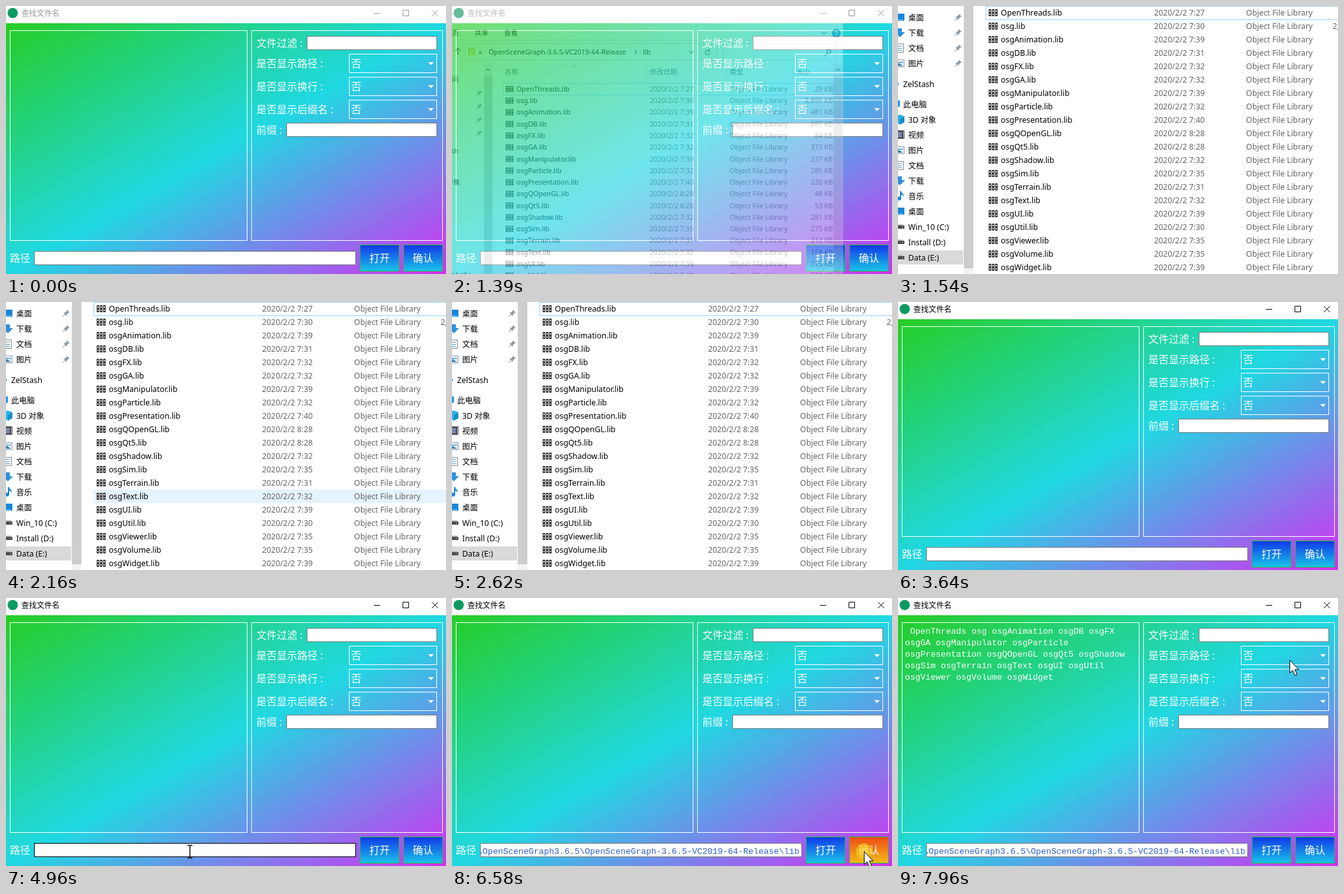
Write an HTML page that moves like this. It is 689 px wide and 420 px high and loops after 8000 ms.

```html
<!DOCTYPE html>
<html lang="zh">
<head>
<meta charset="utf-8">
<title>查找文件名</title>
<style>
html, body { margin: 0; width: 100%; height: 100%; overflow: hidden; background: #fff; }
svg { display: block; width: 689px; height: 420px; }
text { white-space: pre; }
.cjk { font: 300 16px "Noto Sans CJK SC", "Noto Sans CJK", sans-serif; fill: #fff; }
.mono { font: 13.333px "Liberation Mono", monospace; fill: #fff; }
.title { font: 12px "Noto Sans CJK SC", "Noto Sans CJK", sans-serif; }
.ui { font: 12.35px "Noto Sans", "Noto Sans CJK SC", "Noto Sans CJK", sans-serif; fill: #000; }
.dim { fill: #646464; }
</style>
</head>
<body>
<svg id="stage" viewBox="0 0 689 420" xmlns="http://www.w3.org/2000/svg"></svg>
<script>
const LOOP = 8000;
const stage = document.getElementById('stage');

const text = (s, x, y, cls, extra = '') => `<text x="${x}" y="${y}" class="${cls}" ${extra}>${s}</text>`;
const rect = (x, y, w, h, fill, extra = '') => `<rect x="${x}" y="${y}" width="${w}" height="${h}" fill="${fill}" ${extra}/>`;
const frame = (x, y, w, h, stroke, fill = 'none', extra = '') =>
  rect(x + .5, y + .5, w - 1, h - 1, fill, `stroke="${stroke}" ${extra}`);
const line = (d, stroke, width = 1) => `<path d="${d}" fill="none" stroke="${stroke}" stroke-width="${width}"/>`;
const gradient = (id, x2, stops) => `<linearGradient id="${id}" x1="0" y1="0" x2="${x2}" y2="1">` +
  stops.map((c, i) => `<stop offset="${i / (stops.length - 1)}" stop-color="${c}"/>`).join('') + '</linearGradient>';

// Search window
const label = (s, x, y) => text(s + '<tspan dx="4">:</tspan>', x, y, 'cjk');
const combo = y => frame(537, y, 138, 30, '#fff') + text('否', 540.5, y + 21, 'cjk') +
  `<path d="M661 ${y + 13}h9l-4.5 4.5z" fill="#fff"/>`;
const button = (id, s, x) => frame(x, 374, 62, 42, '#18c838', 'url(#idle)', `id="${id}"`) + text(s, x + 15, 401, 'cjk');

const results = [
  ' OpenThreads osg osgAnimation osgDB osgFX',
  'osgGA osgManipulator osgParticle',
  'osgPresentation osgQOpenGL osgQt5 osgShadow',
  'osgSim osgTerrain osgText osgUI osgUtil',
  'osgViewer osgVolume osgWidget'
];
const path = '\\OpenSceneGraph3.6.5\\OpenSceneGraph-3.6.5-VC2019-64-Release\\lib';

function searchWindow() {
  return rect(0, 0, 689, 27, '#fff') +
    '<circle cx="10.5" cy="11" r="8" fill="#0f9a62"/>' +
    text('查找文件名', 24, 16, 'title', 'id="title"') +
    '<path id="winButtons" d="M576 11.5h10M621.5 6.5h9v9h-9zM667 6.5l9.5 9.5m0-9.5l-9.5 9.5" fill="none"/>' +
    rect(0, 27, 689, 393, 'url(#sky)') +
    frame(6, 38, 372, 330, '#fff') + frame(384, 38, 300, 330, '#fff') +
    label('文件过滤', 392, 64) + frame(471, 47, 204, 22, '#7a7a7a', '#fff') +
    label('是否显示路径', 392, 96) + combo(75) +
    label('是否显示换行', 392, 132) + combo(111) +
    label('是否显示后缀名', 392, 168) + combo(147) +
    label('前缀', 392, 200) + frame(439, 183, 236, 22, '#7a7a7a', '#fff') +
    text('路径', 6, 401, 'cjk') + frame(44, 384, 504, 22, '#7a7a7a', '#fff', 'id="input"') +
    `<g clip-path="url(#inputClip)">${text(path, 544, 401, 'mono', 'id="path" text-anchor="end" style="fill:#2c5fd0"')}</g>` +
    rect(47, 387, 1, 16, '#000', 'id="caret"') +
    button('open', '打开', 554) + button('confirm', '确认', 622) +
    `<g id="results">${results.map((s, i) => text(s, 11, 56 + 18 * i, 'mono')).join('')}</g>`;
}

// File browser: name, minute stamp, size in KB
const files = `OpenThreads 7:27 29|osg 7:30 2,895|osgAnimation 7:39 481|osgDB 7:31 697|osgFX 7:32 84
osgGA 7:32 373|osgManipulator 7:39 237|osgParticle 7:32 285|osgPresentation 7:40 220|osgQOpenGL 8:28 48
osgQt5 8:28 53|osgShadow 7:32 281|osgSim 7:35 275|osgTerrain 7:31 212|osgText 7:32 158
osgUI 7:39 173|osgUtil 7:30 730|osgViewer 7:35 402|osgVolume 7:35 166|osgWidget 7:39 121`
  .split(/[|\n]/).map(s => s.split(' '));

const book = x => rect(x, 0, 4, 11, '#3c3c3c') + rect(x + 1, 2, 2, 2, '#ddd') + rect(x + 1, 7, 2, 2, '#bbb');
const libIcon = y => `<g transform="translate(142 ${y})">${book(0)}${book(5)}${book(10)}</g>`;

const fileRow = ([name, time, size], i) => {
  const y = 15 + 21 * i;
  return libIcon(y - 10) + text(name + '.lib', 161, y, 'ui') +
    text('2020/2/2 ' + time, 401, y, 'ui dim') + text('Object File Library', 545, y, 'ui dim') +
    text(size + ' KB', 731, y, 'ui dim', 'text-anchor="end"');
};

// Icons sit in a 16 px box centred on the origin
const icons = {
  desk: rect(-8, -6, 15, 11, '#1686d9') + rect(-6, 3, 11, 1, '#8fd0ff'),
  down: '<path d="M-3-7h6v6h5l-8 8l-8-8h5z" fill="#2f8fdc"/>',
  doc: frame(-6, -7, 12, 14, '#7f8a94', '#fff') + line('M-3-3h6M-3 .5h6M-3 3.5h6', '#4a90c8'),
  pic: frame(-8, -6, 15, 12, '#8a98a3', '#fff') + '<path d="M-6 4v-7h11v3l-4-1z" fill="#74bbea"/><path d="M-6 4l5-4l6 4z" fill="#3a7ca8"/>',
  cloud: '<circle r="6" fill="#0f86d8"/>',
  pc: rect(-8, -6, 16, 10, '#1f9be0') + rect(-3, 5, 7, 1, '#555'),
  cube: '<path d="M0-8l7 3v9l-7 4l-7-4v-9z" fill="#2bb3e6"/><path d="M0-1l7-4v9l-7 4z" fill="#1590c8"/>',
  film: rect(-8, -7, 15, 13, '#3b3b46') + rect(-4, -5, 7, 9, '#7a86a8') + line('M5.5-6v11', '#ddd', 1),
  note: '<path d="M0-8h2c0 4 5 4 4 9c-1-3-3-3-4-3v6a3.5 3 0 1 1-2-3z" fill="#1a86e0"/>',
  disk: rect(-8, -2, 15, 5, '#4c4c4c') + rect(-6, -4, 11, 2, '#b9b9b9') + rect(3, 0, 2, 1, '#6fe06f')
};
const nav = [
  ['desk', '桌面', 18], ['down', '下载', 42], ['doc', '文档', 66], ['pic', '图片', 90],
  ['cloud', 'ZelStash', 122, 8], ['pc', '此电脑', 154, 8],
  ['cube', '3D 对象', 178], ['film', '视频', 202], ['pic', '图片', 226], ['doc', '文档', 250],
  ['down', '下载', 274], ['note', '音乐', 298], ['desk', '桌面', 322],
  ['disk', 'Win_10 (C:)', 346], ['disk', 'Install (D:)', 370], ['disk', 'Data (E:)', 394]
];
const navRow = ([icon, name, y, x = 16]) =>
  `<g transform="translate(${x - 13} ${y})">${icons[icon]}</g>` + text(name, x, y + 4.5, 'ui');
const pin = y => `<g transform="translate(94 ${y}) rotate(45)" fill="#8d979f"><path d="M-3-5h6v1h-1v4l2 2h-8l2-2v-4h-1zM-.5 2h1v5h-1z"/></g>`;

function browser() {
  const heads = [['名称', 140], ['修改日期', 401], ['类型', 545], ['大小', 665]];
  return rect(-120, -140, 869, 680, '#fff') +
    ['主页', '共享', '查看'].map((s, i) => text(s, 33 + 53 * i, -86, 'ui')).join('') +
    line('M711-92l4 4l4-4', '#555', 1.3) + '<circle cx="737" cy="-90" r="8" fill="#1673c8"/>' +
    text('?', 734, -85.5, 'ui', 'style="fill:#fff;font-weight:700"') +
    line('M-120-77.5H749', '#dcdcdc') +
    line('M32-58l3 3l3-3M56-51v-12m-5 5l5-5l5 5', '#555', 1.5) +
    frame(69, -72, 453, 31, '#d5d5d5') + frame(533, -72, 204, 31, '#d5d5d5') +
    rect(74, -64, 12, 14, '#e9c35a') + rect(76, -62, 12, 12, '#f7dc8a') +
    text('«', 93, -52, 'ui') + text('OpenSceneGraph-3.6.5-VC2019-64-Release', 111, -52, 'ui') +
    line('M374-60l4 4l-4 4M472-58l4 4l4-4', '#555', 1.3) + text('lib', 389, -52, 'ui') +
    line('M490.5-71v29', '#dcdcdc') + line('M508-58a4 4 0 1 0 1 3M509-62v4h-4', '#555', 1.3) +
    line('M721-54l-5 5M720-57a3.5 3.5 0 1 0 7 0a3.5 3.5 0 1 0-7 0', '#666', 1.6) +
    heads.map(([s, x]) => text(s, x, -16, 'ui', 'style="fill:#4c607a"')).join('') +
    line('M394.5-34v28M539.5-34v28M658.5-34v28', '#e0e0e0') + line('M260-29l4-4l4 4', '#777') +
    text('快速访问', 8, -2, 'ui') +
    rect(-120, 383, 222, 22, '#d9d9d9') + nav.map(navRow).join('') + [18, 42, 66, 90].map(pin).join('') +
    rect(103, -34, 15, 574, '#f3f3f3') + rect(103, -14, 15, 425, '#cdcdcd') + line('M106-22l4-4l4 4', '#555', 1.6) +
    rect(732, -34, 16, 574, '#f3f3f3') + rect(732, -14, 16, 500, '#cdcdcd') + line('M736-22l4-4l4 4', '#555', 1.6) +
    rect(137, 0, 595, 21, '#e5f3ff', 'id="hover"') + frame(137, 0, 595, 22, '#99d1ff') +
    files.map(fileRow).join('');
}

stage.innerHTML = '<defs>' +
  gradient('sky', 1, ['#26cd26', '#20d8e2', '#d42ff2']) +
  gradient('idle', 0, ['#1238ea', '#18c4e8']) +
  gradient('hot', 0, ['#f04a14', '#f0bc18']) +
  '<clipPath id="inputClip"><rect x="45" y="385" width="502" height="20"/></clipPath></defs>' +
  searchWindow() + `<g id="browser">${browser()}</g>` +
  '<circle id="click" r="12.5" fill="#f8d020" opacity=".65"/>' +
  '<path id="arrow" d="M.5 .5V20.5L5 16.5L8.5 24.5L12 23L8.5 15H14.5Z" fill="#fff" stroke="#000"/>' +
  '<path id="beam" d="M-4-10.5h3l1 1l1-1h3M0-10v19M-4 9.5h3l1-1l1 1h3" fill="none" stroke="#111" stroke-width="1.5"/>';

const el = {};
stage.querySelectorAll('[id]').forEach(n => el[n.id] = n);
const show = (node, on) => node.setAttribute('display', on ? 'inline' : 'none');
const within = (t, a, b) => t >= a && t < b;
const ease = u => u * u * (3 - 2 * u);

// time, x, y of the pointer
const moves = [
  [3640, 300, 426], [3870, 330, 340], [4030, 330, 340], [4480, 288, 398], [5740, 288, 398],
  [6500, 645, 397], [7040, 645, 397], [7500, 610, 215], [7810, 613, 97]
];
function pointer(t) {
  const i = moves.findIndex(m => m[0] > t);
  if (i < 0) return moves[moves.length - 1].slice(1);
  if (i === 0) return moves[0].slice(1);
  const [a, b] = [moves[i - 1], moves[i]];
  const u = ease((t - a[0]) / (b[0] - a[0]));
  return [a[1] + (b[1] - a[1]) * u, a[2] + (b[2] - a[2]) * u];
}

// start, scale, opacity of the file browser
const zoom = [[0, 1, 0], [1390, .87, .35], [1460, .96, .82], [1540, 1, 1], [3320, .9, .79], [3410, .82, .32], [3490, 1, 0]];

function draw(t) {
  const [, scale, alpha] = zoom.filter(z => z[0] <= t).pop();
  show(el.browser, alpha > 0);
  el.browser.setAttribute('opacity', alpha);
  // Shrinks towards its taskbar slot, below and left of the stage
  el.browser.setAttribute('transform', `translate(${-303 * (1 - scale)} ${930 * (1 - scale)}) scale(${scale})`);
  show(el.hover, within(t, 2000, 2620));
  el.hover.setAttribute('y', 21 * (16 - Math.min(9, Math.floor((t - 2000) / 62))));

  const tone = t < 3320 ? '#999' : '#000';
  el.title.setAttribute('fill', tone);
  el.winButtons.setAttribute('stroke', tone);

  const [x, y] = pointer(t);
  const at = `translate(${x} ${y})`;
  const inRow = t >= 3640 && y > 374 && y < 416;
  const onInput = inRow && x > 44 && x < 548 && y > 384 && y < 406;
  const seen = t >= 3640 && !within(t, 5110, 5740);
  show(el.arrow, seen && !onInput);
  show(el.beam, seen && onInput);
  show(el.click, within(t, 6580, 6730));
  for (const n of [el.arrow, el.beam, el.click]) n.setAttribute('transform', at);

  el.input.setAttribute('stroke', onInput ? '#000' : '#7a7a7a');
  el.open.setAttribute('fill', `url(#${inRow && x > 554 && x < 616 ? 'hot' : 'idle'})`);
  el.confirm.setAttribute('fill', `url(#${inRow && x > 622 ? 'hot' : 'idle'})`);
  show(el.caret, within(t, 4430, 4960) || within(t, 5340, 5870));
  el.caret.setAttribute('x', t < 5000 ? 47 : 544);
  show(el.path, t >= 5340);
  show(el.results, t >= 6660);
}

function tick() {
  draw(performance.now() % LOOP);
  requestAnimationFrame(tick);
}
tick();
</script>
</body>
</html>
```
